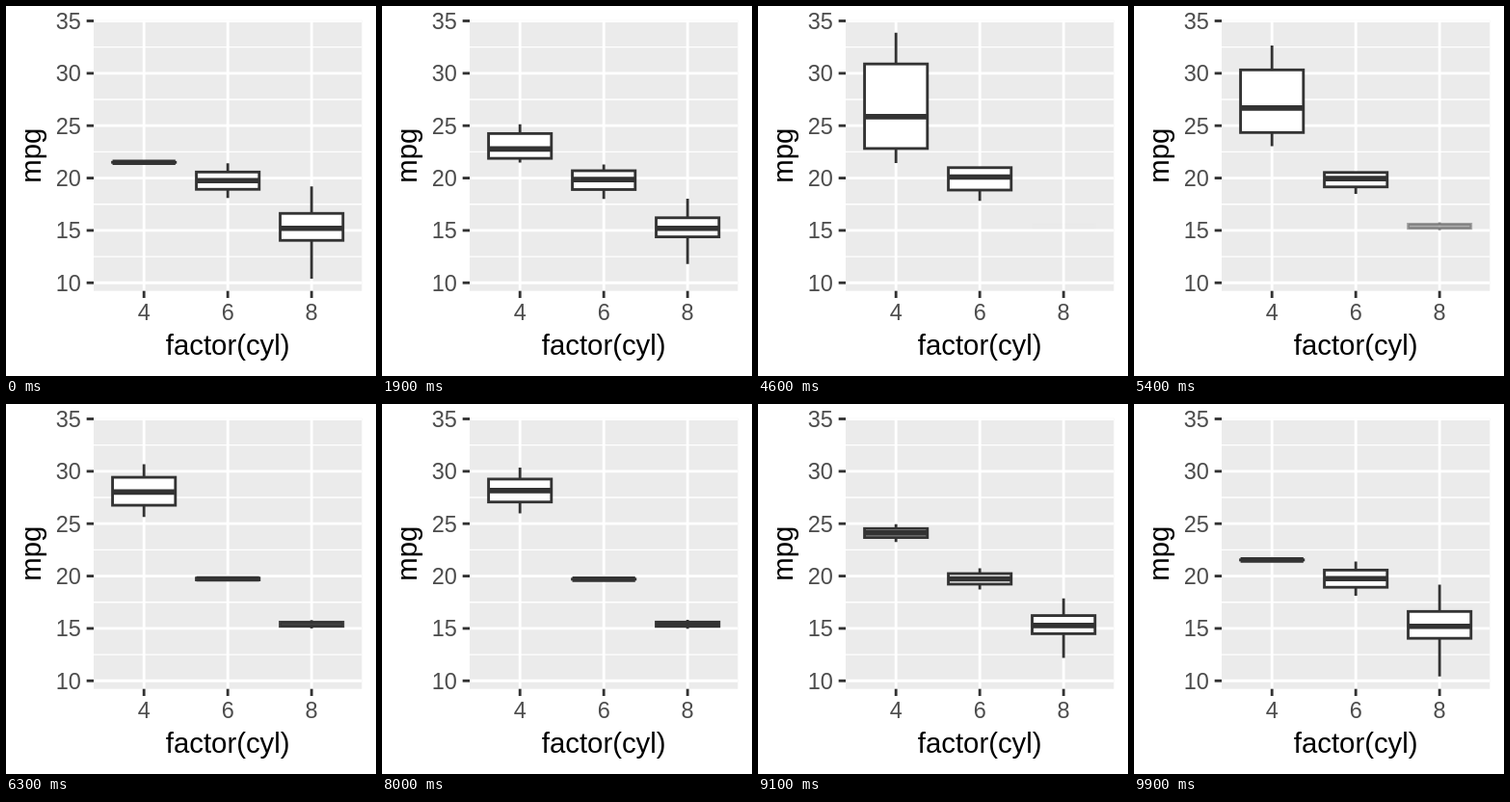
These frames come from a looping animation (384 by 384 pixels, 10 s). An HTML page:

```html
<!DOCTYPE html>
<html lang="en">
<head>
<meta charset="utf-8">
<title>Box plot transitions</title>
<style>
  html, body { margin: 0; width: 100%; height: 100%; overflow: hidden; background: #fff; }
  svg { display: block; width: 384px; height: 384px; }
  text { font-family: "Liberation Sans", Arial, sans-serif; font-size: 29.33px; text-anchor: middle; }
  .label { font-size: 23.47px; fill: #4d4d4d; }
  .label.y { text-anchor: end; }
  .grid { stroke: #fff; stroke-width: 2.845; }
  .grid.minor { stroke-width: 1.42; }
  .tick { stroke: #333; stroke-width: 2.845; }
  .box { stroke: #333; stroke-width: 2.845; fill: #fff; stroke-linejoin: miter; }
  .box .median { stroke-width: 5.69; }
</style>
</head>
<body>
<svg id="plot" viewBox="0 0 384 384"></svg>
<script>
const panel = { left: 91, top: 14.67, right: 369.33, bottom: 295.7 };
const unitX = (panel.right - panel.left) / 3.2;
const unitY = (panel.bottom - panel.top) / 25.85;
const xAt = i => panel.left + (i + 0.6) * unitX;
const yAt = v => panel.top + (35.075 - v) * unitY;
const midX = (panel.left + panel.right) / 2;
const midY = (panel.top + panel.bottom) / 2;
const tickLength = 7.33;

const plot = document.getElementById("plot");

function add(parent, tag, attrs, text) {
  const el = document.createElementNS("http://www.w3.org/2000/svg", tag);
  set(el, attrs);
  if (text !== undefined) el.textContent = text;
  return parent.appendChild(el);
}

function set(el, attrs) {
  for (const key in attrs) el.setAttribute(key, attrs[key]);
}

function line(parent, cls, x1, y1, x2, y2) {
  return add(parent, "line", { class: cls, x1, y1, x2, y2 });
}

// Panel, grid and axes
const clip = add(plot, "clipPath", { id: "panel" });
const area = {
  x: panel.left, y: panel.top,
  width: panel.right - panel.left, height: panel.bottom - panel.top
};
add(clip, "rect", area);
add(plot, "rect", { ...area, fill: "#ebebeb" });
const inside = add(plot, "g", { "clip-path": "url(#panel)" });

for (let v = 12.5; v < 35; v += 5)
  line(inside, "grid minor", panel.left, yAt(v), panel.right, yAt(v));

for (let v = 10; v <= 35; v += 5) {
  const y = yAt(v);
  line(inside, "grid", panel.left, y, panel.right, y);
  line(plot, "tick", panel.left - tickLength, y, panel.left, y);
  add(plot, "text", { class: "label y", x: 77.8, y: y + 8.4 }, v);
}

["4", "6", "8"].forEach((name, i) => {
  const x = xAt(i);
  line(inside, "grid", x, panel.top, x, panel.bottom);
  line(plot, "tick", x, panel.bottom, x, panel.bottom + tickLength);
  add(plot, "text", { class: "label", x, y: 325.7 }, name);
});

add(plot, "text", { x: midX, y: 361.5 }, "factor(cyl)");
add(plot, "text", { transform: `translate(35.7 ${midY}) rotate(-90)` }, "mpg");

// Boxes: low whisker, lower hinge, median, upper hinge, high whisker
const states = [
  [[21.5, 21.5, 21.5, 21.5, 21.5], [18.1, 18.925, 19.75, 20.575, 21.4], [10.4, 14.05, 15.2, 16.625, 19.2]],
  [[21.4, 22.8, 25.85, 30.9, 33.9], [17.8, 18.85, 20.1, 21, 21], null],
  [[26, 27.1, 28.2, 29.3, 30.4], [19.7, 19.7, 19.7, 19.7, 19.7], [15, 15.2, 15.4, 15.6, 15.8]]
];

const boxes = [0, 1, 2].map(i => {
  const group = add(inside, "g", { class: "box" });
  const x = xAt(i), half = 0.375 * unitX;
  return {
    group,
    high: line(group, "", x, 0, x, 0),
    low: line(group, "", x, 0, x, 0),
    body: add(group, "rect", { x: x - half, width: 2 * half }),
    median: line(group, "median", x - half, 0, x + half, 0)
  };
});

function drawBox(box, stats, alpha) {
  const [low, lower, middle, upper, high] = stats.map(yAt);
  set(box.group, { "stroke-opacity": alpha, "fill-opacity": alpha });
  set(box.high, { y1: upper, y2: high });
  set(box.low, { y1: lower, y2: low });
  // A tiny height keeps the outline of a collapsed box visible.
  set(box.body, { y: upper, height: Math.max(lower - upper, 0.01) });
  set(box.median, { y1: middle, y2: middle });
}

// Transitions: first and last step, in tenths of a second
const moves = [[11, 33], [45, 67], [79, 100]];

function draw(step) {
  let from = 0, p = 0;
  moves.forEach(([start, end], i) => {
    if (step >= start) {
      from = i;
      p = Math.min(1, (step - start) / (end - start));
    }
  });
  const to = (from + 1) % 3;
  const k = (1 - Math.cos(Math.PI * p)) / 2;

  boxes.forEach((box, i) => {
    const a = states[from][i], b = states[to][i];
    const shown = (a || p > 0) && (b || p < 1);
    box.group.style.display = shown ? "" : "none";
    if (!shown) return;
    const start = a || b;                  // enters by fading
    const end = b || a.map(() => a[2]);    // leaves by shrinking to its median
    drawBox(box, start.map((v, j) => v + (end[j] - v) * k), a ? 1 : k);
  });
}

let shownStep = -1;
const origin = performance.now();

function tick() {
  const step = Math.floor((performance.now() - origin) / 100) % 100;
  if (step !== shownStep) draw(shownStep = step);
  requestAnimationFrame(tick);
}
tick();
</script>
</body>
</html>
```
